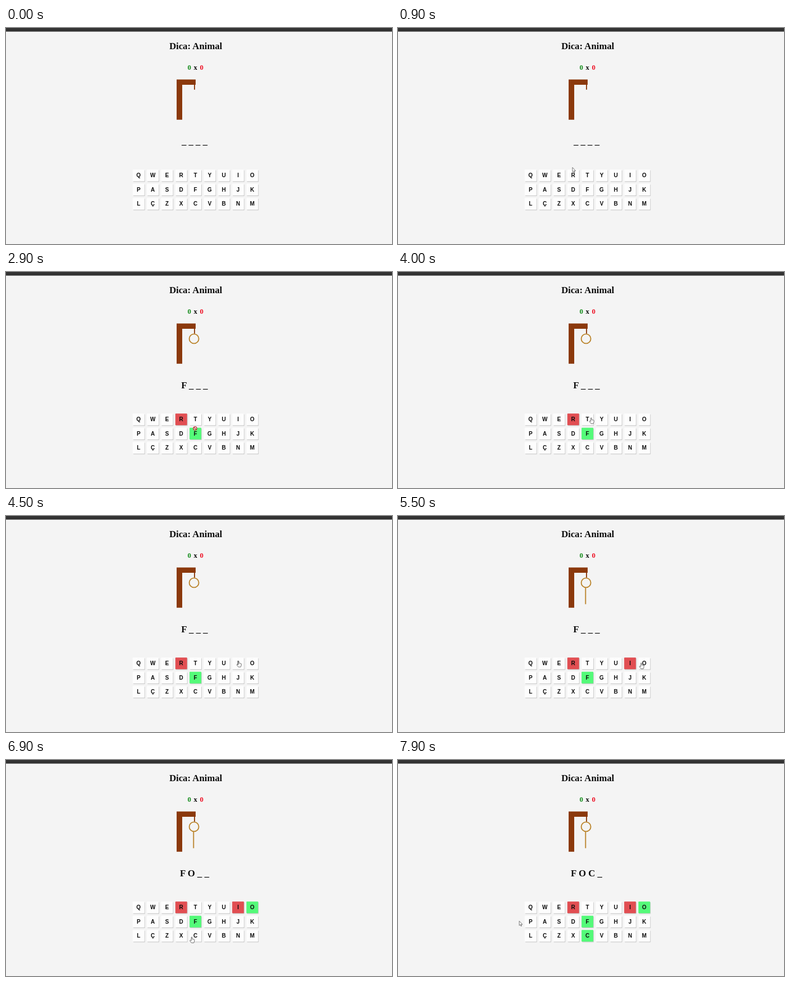
Write an HTML page that moves like this. It is 690 px wide and 388 px high and loops after 8000 ms.

```html
<!DOCTYPE html>
<html lang="pt-BR">
<head>
<meta charset="utf-8">
<title>Jogo da forca</title>
<style>
html, body { margin: 0; width: 100%; height: 100%; overflow: hidden; background: #f4f4f4; }
svg { display: block; width: 100%; height: 100%; }
text { text-anchor: middle; font-weight: bold; fill: #0c0c0c; }
.serif { font-family: "Liberation Serif", "Times New Roman", serif; font-size: 16.8px; }
.score { font-size: 12.8px; }
.key { font-family: "Liberation Sans", Arial, sans-serif; font-size: 10px; }
</style>
</head>
<body>
<svg id="stage" viewBox="0 0 690 388" xmlns="http://www.w3.org/2000/svg">
  <rect width="690" height="388" fill="#f4f4f4"/>
  <rect width="690" height="6.5" fill="#333"/>
  <text class="serif" x="339.2" y="38">Dica: Animal</text>
  <g class="serif">
    <text class="score" x="327.6" y="75.2" style="fill:#118a18">0</text>
    <text class="score" x="338.7" y="75.2">x</text>
    <text class="score" x="349.6" y="75.2" style="fill:#ee1024">0</text>
  </g>
  <path d="M305 92.5H339V102H315V164.7H305Z" fill="#8b390c"/>
  <path d="M337 101V110.8" stroke="#8b390c" stroke-width="1.9"/>
  <g fill="none" stroke="#bb862f" stroke-width="1.9">
    <circle id="head" cx="336.1" cy="119.9" r="8.5"/>
    <path id="body" d="M335.3 128.4V158.4"/>
  </g>
  <text id="word" class="serif" x="337" y="209"></text>
  <g id="keys"></g>
  <g id="cursor" stroke-linejoin="round">
    <path id="arrow" d="M0 0V8L1.9 6.4 3.1 9.2 4.3 8.7 3.1 6H5.6Z" fill="#fff" stroke="#555" stroke-width=".8"/>
    <path id="hand" d="M-1 6.6V.9Q-1 0-.2 0 .6 0 .6.9V3.6L4.1 4.3Q4.8 4.5 4.8 5.4L4.2 8.6 3.6 10.4H-.6L-3.2 7.2Q-3.9 6-3 5.6-2 5.5-1 6.6Z" fill="#fff" stroke="#4a4a4a" stroke-width=".8"/>
    <g id="block" fill="none">
      <circle r="3.1" fill="#fff" fill-opacity=".65" stroke="#c91f35" stroke-width="1.3"/>
      <path d="M-2.1-2.1 2.1 2.1" stroke="#c91f35" stroke-width="1.3"/>
    </g>
  </g>
</svg>
<script>
const LOOP = 8000, STEP = 100;
const NS = "http://www.w3.org/2000/svg";
const RED = "#e14e52", GREEN = "#54fa79";
const $ = id => document.getElementById(id);

// Guesses: time, letter, hit or miss
const guesses = [[1800, "R", false], [2900, "F", true], [4900, "I", false], [5900, "O", true], [7400, "C", true]];
const answer = "FOCA";

// Pointer moves: start, steps, end x, end y, shape on the way, shape at rest
const moves = [
  [400, 1, 243, 313, "hand", "hand"],
  [500, 1, 281.5, 181.5, "arrow", "arrow"],
  [800, 3, 322.5, 274.6, "arrow", "hand"],
  [1800, 1, 322.5, 274.6, "arrow", "arrow"],
  [2200, 3, 338, 281, "arrow", "hand"],
  [2900, 1, 338, 281, "block", "block"],
  [3400, 2, 340, 262, "arrow", "hand"],
  [4000, 6, 416, 260.8, "hand", "hand"],
  [4900, 1, 416, 260.8, "block", "block"],
  [5300, 3, 435, 264, "hand", "hand"],
  [5900, 1, 435, 264, "block", "block"],
  [6400, 3, 295.6, 300.6, "hand", "arrow"],
  [6800, 2, 332.2, 318, "hand", "hand"],
  [7400, 1, 332.2, 318, "block", "block"],
  [7800, 2, 216.8, 289.3, "hand", "arrow"]
];

function add(tag, attrs, text) {
  const el = document.createElementNS(NS, tag);
  for (const k in attrs) el.setAttribute(k, attrs[k]);
  if (text) el.textContent = text;
  $("keys").append(el);
  return el;
}

const keys = {};
["QWERTYUIO", "PASDFGHJK", "LÇZXCVBNM"].forEach((row, r) =>
  [...row].forEach((letter, c) => {
    const x = 237 + c * 25.4, y = 264.7 + r * 25.5;
    const box = { width: 21, height: 21, rx: 1 };
    add("rect", { ...box, x: x - 9.5, y: y - 9.3, fill: "#cdcdcd" });
    keys[letter] = add("rect", { ...box, x: x - 10.5, y: y - 10.5, fill: "#fdfdfd" });
    add("text", { class: "key", x, y: y + 3.6 }, letter);
  }));

const show = (id, on) => $(id).setAttribute("visibility", on ? "visible" : "hidden");

function pointer(t) {
  let x = 0, y = 0, shape = "";
  for (const [start, steps, ex, ey, going, rest] of moves) {
    if (t < start) break;
    const p = Math.min(1, (Math.floor((t - start) / STEP) + 1) / steps);
    const ease = p * p * (3 - 2 * p);
    x += (ex - x) * ease;
    y += (ey - y) * ease;
    shape = p < 1 ? going : rest;
  }
  return { x, y, shape };
}

function draw(t) {
  const done = guesses.filter(g => t >= g[0]);
  for (const k in keys) {
    const g = done.find(d => d[1] === k);
    keys[k].setAttribute("fill", !g ? "#fdfdfd" : g[2] ? GREEN : RED);
  }
  const misses = done.filter(g => !g[2]).length;
  show("head", misses > 0);
  show("body", misses > 1);
  $("word").textContent = [...answer].map(c => done.some(g => g[1] === c) ? c : "_").join(" ");

  const { x, y, shape } = pointer(t);
  for (const id of ["arrow", "hand", "block"]) show(id, id === shape);
  $("cursor").setAttribute("transform", `translate(${x} ${y})`);
}

const t0 = performance.now();
function tick() {
  draw((performance.now() - t0) % LOOP);
  requestAnimationFrame(tick);
}
tick();
</script>
</body>
</html>
```
